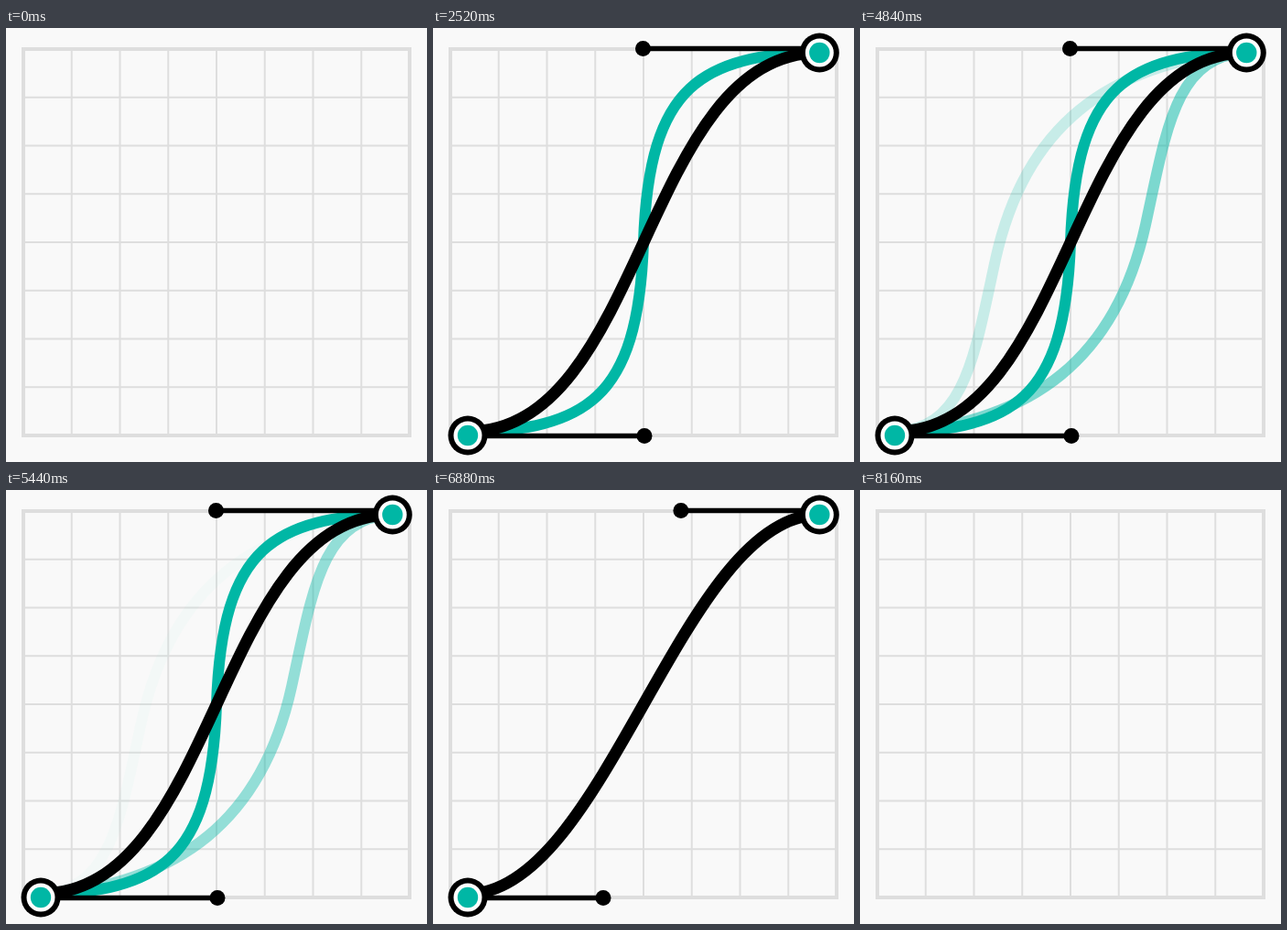
Animation of 460 by 474 pixels, one loop 8200 ms. Source, as an HTML page:

```html
<!DOCTYPE html>
<html lang="en">
<head>
<meta charset="utf-8">
<title>Curve editor</title>
<style>
  html, body { margin: 0; height: 100%; overflow: hidden; background: #f9f9f9; }
  svg { display: block; width: 460px; height: 474px; }
  .teal { stroke: #00b7a5; stroke-width: 12; }
</style>
</head>
<body>
<svg viewBox="0 0 460 474" fill="none">
  <defs>
    <g id="node">
      <circle r="21.5" fill="#000"/>
      <circle r="15.5" fill="#fff"/>
      <circle r="11.2" fill="#00b7a5"/>
    </g>
    <path id="late" d="M38 443C190 430 280 360 312 215C335 110 345 30 422 27"/>
  </defs>
  <g stroke="#dedede">
    <path id="grid" stroke-width="2"/>
    <rect x="19" y="23" width="422" height="422" stroke-width="4"/>
  </g>
  <use id="left" href="#late" class="teal" transform="rotate(180 230 234)"/>
  <use id="right" href="#late" class="teal"/>
  <path id="middle" class="teal" d="M38 443C165 436 224 410 230 234C236 58 295 32 422 25"/>
  <g id="handles">
    <path id="bars" stroke="#000" stroke-width="5.5"/>
    <circle id="lowDot" cy="445.5" r="8.5" fill="#000"/>
    <circle id="highDot" cy="22.5" r="8.5" fill="#000"/>
  </g>
  <path id="curve" stroke="#000" stroke-width="13" pathLength="1"/>
  <use id="lowNode" href="#node"/>
  <use id="highNode" href="#node"/>
</svg>
<script>
const LOOP = 8200;
const el = id => document.getElementById(id);
const set = (id, attrs) => {
  for (const name in attrs) el(id).setAttribute(name, attrs[name]);
};
const mix = (a, b, p) => a + (b - a) * p;
const ease = p => p < 0.5 ? 4 * p ** 3 : 1 - 4 * (1 - p) ** 3;
const ramp = (t, start, end) => ease(Math.min(1, Math.max(0, (t - start) / (end - start))));

// Start and end of each part's entrance, then of its exit
const tracks = {
  lowNode: [480, 900, 7740, 8160],
  line: [700, 1240, 7460, 8000],
  highNode: [1000, 1400, 7330, 7740],
  handles: [1400, 2180, 6575, 7375],
  middle: [2040, 2510, 6010, 6600],
  right: [2530, 3240, 5160, 5960],
  left: [3120, 3840, 4800, 5720]
};
const level = (name, t) => {
  const [inStart, inEnd, outStart, outEnd] = tracks[name];
  return ramp(t, inStart, inEnd) - ramp(t, outStart, outEnd);
};

let grid = '';
for (let i = 1; i < 8; i++) {
  const step = i * 52.75;
  grid += `M${19 + step} 23v422M19 ${23 + step}h422`;
}
set('grid', { d: grid });

function draw(t) {
  const bend = level('handles', t);
  const lowX = mix(30, 231, bend), highX = mix(414.5, 229.5, bend);
  set('handles', { opacity: bend > 0 ? 1 : 0 });
  set('bars', { d: `M38 445.5H${lowX}M422 22.5H${highX}` });
  set('lowDot', { cx: lowX });
  set('highDot', { cx: highX });

  set('curve', {
    d: `M38 441C${mix(38, 231, bend)} 441 ${mix(422, 229.5, bend)} 27 422 27`,
    'stroke-dasharray': `${level('line', t) * 1.01} 2`
  });
  set('lowNode', { transform: `translate(38 445) scale(${level('lowNode', t)})` });
  set('highNode', { transform: `translate(422.3 27) scale(${level('highNode', t)})` });

  set('middle', { opacity: level('middle', t) });
  set('right', { opacity: 0.5 * level('right', t) });
  set('left', { opacity: 0.2 * level('left', t) });
}

const begin = performance.now();
function tick() {
  draw((performance.now() - begin) % LOOP);
  requestAnimationFrame(tick);
}
tick();
</script>
</body>
</html>
```
